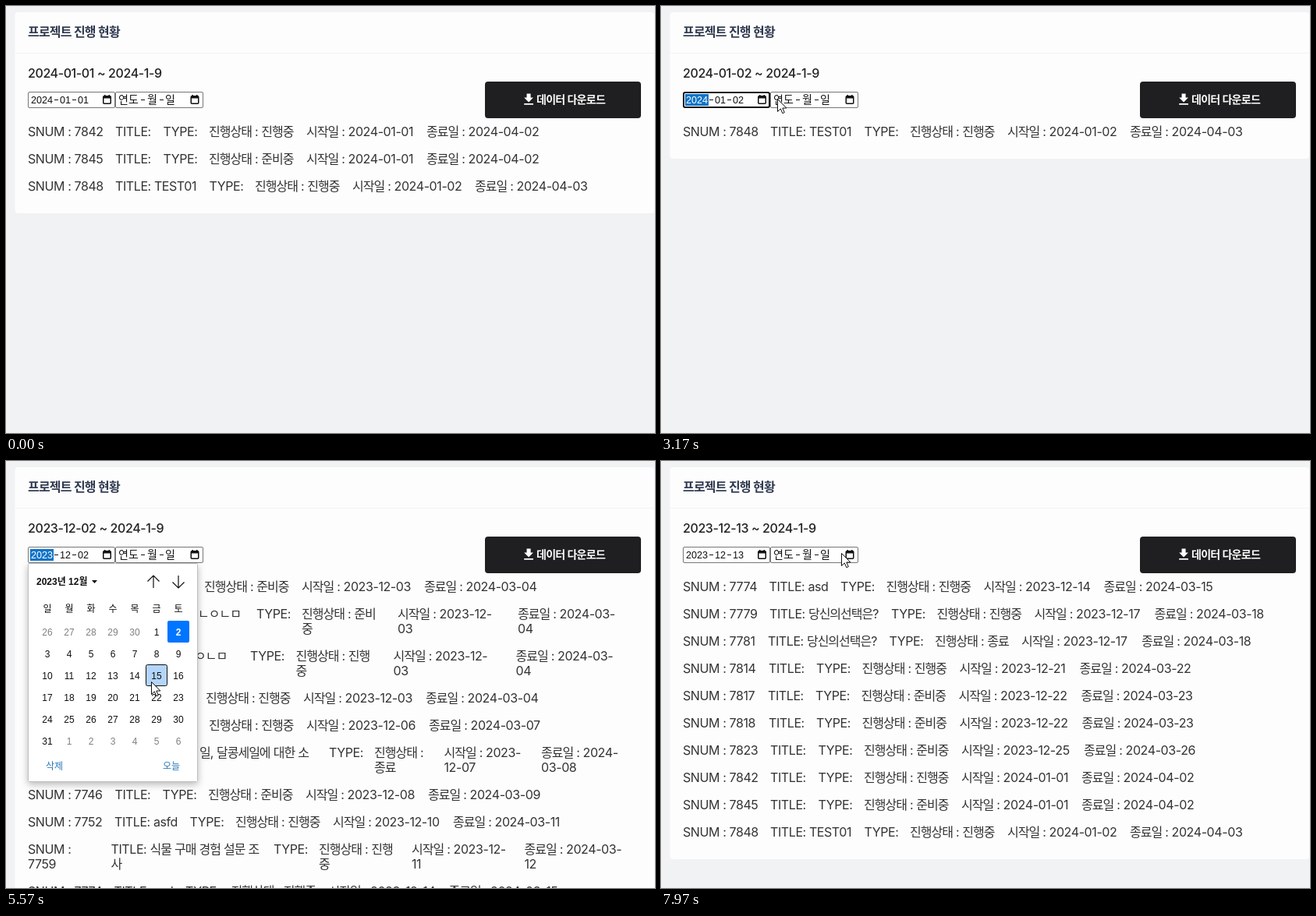
Recreate the animation shown at these times as an HTML page with a canvas. Size 832x548 px, loop 8000 ms.

```html
<!DOCTYPE html>
<html lang="ko">
<head>
<meta charset="utf-8">
<title>프로젝트 진행 현황</title>
<style>
  html, body { margin: 0; width: 100%; height: 100%; overflow: hidden; background: #f1f2f4; }
  canvas { display: block; }
</style>
</head>
<body>
<canvas id="stage" width="832" height="548"></canvas>
<script>
const ctx = document.getElementById('stage').getContext('2d');
const LOOP = 8000, DAY = 86400000;
const PAGE = '#f1f2f4', INK = '#333335', SLATE = '#303a50', BLACK = '#101010';
const GREY = '#808080', FRAME = '#767676', BLUE = '#0075ff', LINK = '#2a78b8';
const KOREAN = '"Noto Sans CJK KR", "Noto Sans CJK", sans-serif';
const UI = '"Liberation Sans", ' + KOREAN;

// ---- data ----
const row = (num, titleX, title, typeX, state, start, end) => {
  const stateX = typeX + 58.5;
  const startX = stateX + (state.length > 2 ? 125 : 111);
  const ones = start.split('1').length - 1;
  return { start, height: 35, parts: [
    [28, 'SNUM : ' + num], [titleX, 'TITLE: ' + title], [typeX, 'TYPE:'],
    [stateX, '진행상태 : ' + state], [startX, '시작일 : ' + start],
    [startX + 160 - 3 * ones, '종료일 : ' + end]
  ] };
};
const tallRow = (start, ...parts) => ({ start, height: 54, parts });

const ROWS = [
  row(7711, 134, '', 195.5, '준비중', '2023-12-03', '2024-03-04'),
  tallRow('2023-12-03', [246, 'ㄴㅇㄴㅁ'], [321, 'TYPE:'], [379, '진행상태 : 준비/중'],
    [502, '시작일 : 2023-12-/03'], [656, '종료일 : 2024-03-/04']),
  tallRow('2023-12-03', [242, 'ㅇㄴㅁ'], [313, 'TYPE:'], [371.5, '진행상태 : 진행/중'],
    [496.5, '시작일 : 2023-12-/03'], [653.5, '종료일 : 2024-03-/04']),
  row(7717, 136, '', 197.5, '진행중', '2023-12-03', '2024-03-04'),
  row(7738, 140, '', 201.5, '진행중', '2023-12-06', '2024-03-07'),
  tallRow('2023-12-07', [248, '일, 달콩세일에 대한 소'], [414, 'TYPE:'], [472, '진행상태 :/종료'],
    [561.5, '시작일 : 2023-/12-07'], [686, '종료일 : 2024-/03-08']),
  row(7746, 139.5, '', 200.5, '준비중', '2023-12-08', '2024-03-09'),
  row(7752, 139, 'asfd', 235.5, '진행중', '2023-12-10', '2024-03-11'),
  tallRow('2023-12-11', [28, 'SNUM :/7759'], [134.5, 'TITLE: 식물 구매 경험 설문 조/사'],
    [343, 'TYPE:'], [401, '진행상태 : 진행/중'], [520, '시작일 : 2023-12-/11'],
    [664.5, '종료일 : 2024-03-/12']),
  row(7774, 138.5, 'asd', 230, '진행중', '2023-12-14', '2024-03-15'),
  row(7779, 139, '당신의선택은?', 295, '진행중', '2023-12-17', '2024-03-18'),
  row(7781, 137, '당신의선택은?', 292.5, '종료', '2023-12-17', '2024-03-18'),
  row(7814, 138, '', 199, '진행중', '2023-12-21', '2024-03-22'),
  row(7817, 137, '', 198, '준비중', '2023-12-22', '2024-03-23'),
  row(7818, 138, '', 199, '준비중', '2023-12-22', '2024-03-23'),
  row(7823, 140, '', 201.5, '준비중', '2023-12-25', '2024-03-26'),
  row(7842, 140, '', 201.5, '진행중', '2024-01-01', '2024-04-02'),
  row(7845, 140, '', 201.5, '준비중', '2024-01-01', '2024-04-02'),
  row(7848, 140, 'TEST01', 260.5, '진행중', '2024-01-02', '2024-04-03')
];

// ---- timeline ----
const SCROLL_AT = 4250, SCROLL_MS = 440;
const STATES = [
  { at: 0, date: '2024-01-01' },
  { at: 1640, date: '2024-01-01', open: true },
  { at: 2600, date: '2024-01-02', focus: true },
  { at: 3560, date: '2024-01-02', open: true },
  { at: SCROLL_AT, date: '2023-12-02', open: true },
  { at: 5990, date: '2023-12-21' },
  { at: 6690, date: '2023-12-21', open: true },
  { at: 7470, date: '2023-12-13' }
];
const PATH = [
  [700, 400, -20], [1450, 130, 120], [1700, 130, 120], [2100, 146, 182], [2500, 108, 217],
  [2640, 108, 217], [3170, 149, 119], [3480, 130, 121], [3600, 130, 121], [4030, 188, 155],
  [4260, 188, 155], [4430, 157, 138], [4930, 165, 170], [5570, 186, 283], [5730, 186, 283],
  [5900, 166, 302], [6010, 166, 302], [6430, 137, 132], [6620, 130, 121], [6740, 130, 121],
  [7230, 138, 274], [7500, 138, 274], [7970, 231, 118], [8000, 231, 118]
];

function cursorAt(t) {
  const i = PATH.findIndex(p => p[0] > t);
  if (i < 1) return null;
  const [t0, x0, y0] = PATH[i - 1], [t1, x1, y1] = PATH[i];
  const p = (t - t0) / (t1 - t0), k = p * p * (3 - 2 * p);
  return { x: Math.round(x0 + (x1 - x0) * k), y: Math.round(y0 + (y1 - y0) * k) };
}

// Weeks scrolled down from the week of 26 November 2023.
function weekOffset(t) {
  const p = Math.min(1, Math.max(0, (t - SCROLL_AT) / SCROLL_MS));
  return 5 * (1 - p) ** 2;
}

// ---- drawing helpers ----
function text(str, x, y, { size = 16, weight = 400, color = INK } = {}) {
  const hangulTracking = weight >= 700 ? -0.052 : -0.063;
  ctx.fillStyle = color;
  ctx.textAlign = 'left';
  for (const run of str.match(/[ㄱ-힣]+|[^ㄱ-힣]+/g)) {
    const hangul = /[ㄱ-힣]/.test(run);
    ctx.font = `${weight} ${size}px ${hangul ? KOREAN : 'Inter, sans-serif'}`;
    ctx.letterSpacing = size * (hangul ? hangulTracking : -0.025) + 'px';
    ctx.fillText(run, x, y);
    x += ctx.measureText(run).width;
  }
  ctx.letterSpacing = '0px';
}

function label(str, x, y, { size = 12, weight = 400, color = BLACK, align = 'center' } = {}) {
  ctx.font = `${weight} ${size}px ${UI}`;
  ctx.fillStyle = color;
  ctx.textAlign = align;
  ctx.fillText(str, x, y);
}

function box(x, y, w, h, r, fill, stroke, width = 1) {
  ctx.beginPath();
  ctx.roundRect(x, y, w, h, r);
  if (fill) { ctx.fillStyle = fill; ctx.fill(); }
  if (stroke) { ctx.strokeStyle = stroke; ctx.lineWidth = width; ctx.stroke(); }
}

function shape(d, x, y, scale, fill, stroke, width = 1) {
  const path = new Path2D(d);
  ctx.save();
  ctx.translate(x, y);
  ctx.scale(scale, scale);
  if (fill) { ctx.fillStyle = fill; ctx.fill(path); }
  if (stroke) { ctx.strokeStyle = stroke; ctx.lineWidth = width; ctx.stroke(path); }
  ctx.restore();
}

// ---- parts ----
function drawPage(date) {
  const rows = ROWS.filter(r => r.start >= date);
  const height = rows.reduce((sum, r) => sum + r.height, 0);
  ctx.fillStyle = PAGE;
  ctx.fillRect(0, 0, 832, 548);
  box(11.5, 8, 819.5, 153 + height, 4, '#fdfdfd');
  ctx.fillStyle = '#f3f3f5';
  ctx.fillRect(12, 60, 819, 1);
  text('프로젝트 진행 현황', 28, 39, { weight: 700, color: SLATE });
  text(date + ' ~ 2024-1-9', 28, 92, { weight: 500, color: '#222224' });

  box(614, 97, 200, 47, 4, '#1f1f21');
  shape('M19 9h-4V3H9v6H5l7 7 7-7zM5 18v2h14v-2z', 660, 110, 0.84, '#fff');
  text('데이터 다운로드', 680, 125, { size: 14, weight: 700, color: '#fff' });

  let y = 167;
  for (const r of rows) {
    for (const [x, str] of r.parts)
      str.split('/').forEach((line, i) => text(line, x, y + 19 * i));
    y += r.height;
  }
}

function drawCalendarIcon(x) {
  box(x + 0.75, 115.75, 9.5, 9.5, 1, null, BLACK, 1.5);
  ctx.fillStyle = BLACK;
  ctx.fillRect(x + 1, 116, 9, 2.5);
  ctx.fillRect(x + 2, 114, 1.5, 2);
  ctx.fillRect(x + 7.5, 114, 1.5, 2);
}

function drawInputs({ date, open, focus }) {
  box(140.5, 110.5, 112, 20, 1.5, '#fff', FRAME);
  if (focus) box(29, 111, 110, 19, 2, '#fff', BLACK, 2);
  else box(28.5, 110.5, 111, 20, 1.5, '#fff', FRAME);
  const active = open || focus;
  if (active) {
    ctx.fillStyle = '#0f74c8';
    ctx.fillRect(31, 113, 30, 15);
  }
  const [year, month, day] = date.split('-');
  const digits = { size: 12.6, align: 'left' }, hangul = { size: 14, align: 'left' };
  label(year, 32, 125, { ...digits, color: active ? '#fff' : BLACK });
  label(month, 69, 125, digits);
  label(day, 92, 125, digits);
  label('연도', 144, 125, hangul);
  label('월', 181, 125, hangul);
  label('일', 204, 125, hangul);
  ctx.fillStyle = BLACK;
  for (const x of [62, 85, 173, 197]) ctx.fillRect(x, 120, 5, 1);
  drawCalendarIcon(124);
  drawCalendarIcon(236.5);
}

function drawDays(date, offset, cursor) {
  const month = date.slice(0, 7);
  const inGrid = cursor && cursor.x >= 39 && cursor.x < 235 && cursor.y >= 205 && cursor.y < 373;
  ctx.save();
  ctx.beginPath();
  ctx.rect(29, 204, 216, 170);
  ctx.clip();
  for (let week = Math.floor(offset); week < offset + 6; week++) {
    for (let col = 0; col < 7; col++) {
      const day = new Date(Date.UTC(2023, 10, 26) + (week * 7 + col) * DAY);
      const iso = day.toISOString().slice(0, 10);
      const x = 39 + 28 * col, y = 205 + 28 * (week - offset);
      const picked = iso === date;
      const hover = inGrid && cursor.x >= x && cursor.x < x + 28 && cursor.y >= y && cursor.y < y + 28;
      if (picked) {
        box(x, y, 28, 28, 2, BLUE);
        if (!inGrid || hover) box(x + 1, y + 1, 26, 26, 2, null, BLACK, 2);
      } else if (hover) {
        box(x + 0.5, y + 0.5, 27, 27, 2, '#b3d5fa', BLACK);
      } else if (iso === '2024-01-09') {
        box(x + 0.5, y + 0.5, 27, 27, 2, null, FRAME);
      }
      label(day.getUTCDate(), x + 14, y + 19, {
        weight: picked ? 700 : 400,
        color: picked ? '#fff' : iso.startsWith(month) ? BLACK : GREY
      });
    }
  }
  ctx.restore();
}

function drawPopup(date, offset, cursor) {
  ctx.save();
  ctx.shadowColor = 'rgba(0, 0, 0, 0.28)';
  ctx.shadowBlur = 10;
  ctx.shadowOffsetY = 3;
  box(28, 132, 218, 280, 1, '#fff');
  ctx.restore();
  box(28.5, 131.5, 217, 280, 1, null, '#bfbfbf');

  const [year, month] = date.split('-');
  label(`${year}년 ${month}월`, 39, 159, { weight: 700, align: 'left' });
  shape('M0 0h7L3.5 4z', 110, 153, 1, BLACK);
  shape('M0 8V-8M-7.5 -0.5L0 -8L7.5 -0.5', 189, 155, 1, null, BLACK, 1.2);
  shape('M0 -8V8M-7.5 0.5L0 8L7.5 0.5', 221, 155, 1, null, BLACK, 1.2);
  [...'일월화수목금토'].forEach((name, i) => label(name, 53 + 28 * i, 194));
  drawDays(date, offset, cursor);
  label('삭제', 62, 396, { color: LINK });
  label('오늘', 212, 396, { color: LINK });
}

function draw() {
  const t = performance.now() % LOOP;
  const state = STATES.findLast(s => s.at <= t);
  const cursor = cursorAt(t);
  drawPage(state.date);
  drawInputs(state);
  if (state.open) drawPopup(state.date, weekOffset(t), cursor);
  if (cursor)
    shape('M0 0V16L3.8 12.4L6.3 18.2L8.8 17.1L6.3 11.5H11.4Z', cursor.x + 0.5, cursor.y + 0.5, 1, '#fff', BLACK);
  requestAnimationFrame(draw);
}
requestAnimationFrame(draw);
</script>
</body>
</html>
```
